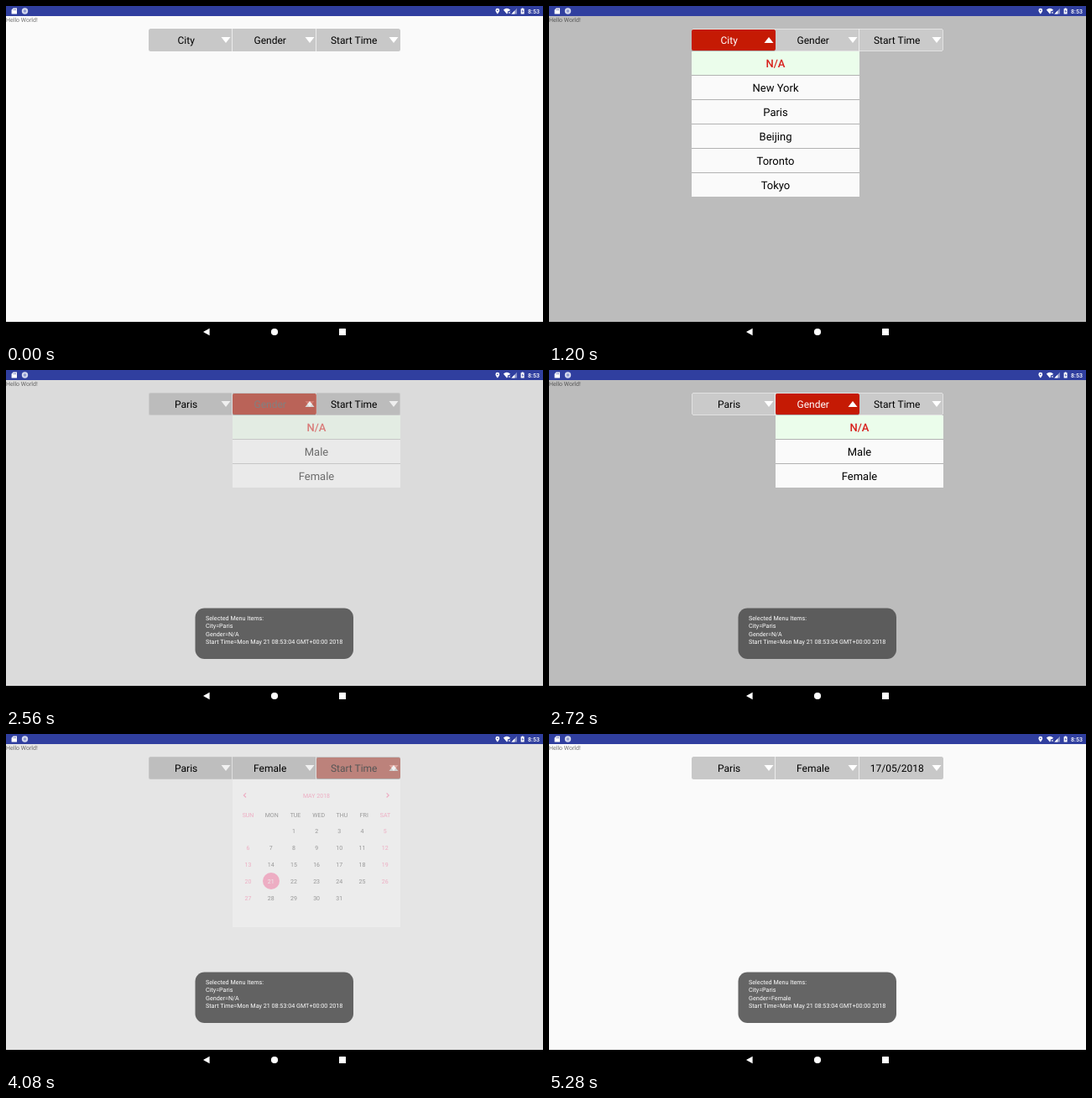
An HTML page that plays this animation: 640x400 px, repeating every 6560 ms.

```html
<!DOCTYPE html>
<html lang="en">
<head>
<meta charset="utf-8">
<title>Drop-down menu</title>
<style>
html, body { margin: 0; width: 100%; height: 100%; overflow: hidden; background: #fafafa; }
svg { display: block; width: 640px; height: 400px; font-family: Roboto, sans-serif; text-rendering: geometricPrecision; }
</style>
</head>
<body>
<svg id="stage" viewBox="0 0 640 400"></svg>
<script>
const LOOP = 6560, STEP = 80;
const PINK = '#ff4081', RED = '#c51a04';
const stage = document.getElementById('stage');

function add(parent, name, attrs = {}, content) {
  const node = document.createElementNS('http://www.w3.org/2000/svg', name);
  for (const key in attrs) node.setAttribute(key, attrs[key]);
  if (content !== undefined) node.textContent = content;
  return parent.appendChild(node);
}
const group = (parent = stage) => add(parent, 'g');
const box = (parent, x, y, width, height, fill, extra) =>
  add(parent, 'rect', { x, y, width, height, fill, ...extra });
const path = (parent, d, fill, extra) => add(parent, 'path', { d, fill, ...extra });
const dot = (parent, cx, cy, r, fill) => add(parent, 'circle', { cx, cy, r, fill });
const label = (parent, x, y, size, str, fill = '#000', extra) =>
  add(parent, 'text', { x, y, 'font-size': size, fill, 'text-anchor': 'middle', ...extra }, str);
const left = { 'text-anchor': 'start' };

function arrow(parent, x, up) {
  const [base, tip] = up ? [44, 37] : [37, 44];
  path(parent, `M${x - 5.5} ${base}h11L${x} ${tip}z`, '#fff');
}

// Three tabs; the open one is red with its arrow turned up.
function tabs(parent, names, open = -1) {
  const isOpen = open >= 0;
  if (isOpen) box(parent, 170.5, 27.5, 299, 26, '#cacaca', { rx: 1.5, stroke: '#e2e2e2' });
  else box(parent, 170, 27, 300, 27, '#c8c8c8', { rx: 2.5 });
  for (const x of [269, 369]) box(parent, x, 27, 1, 27, '#ececec');
  if (isOpen) {
    box(parent, 170 + open * 100, 29, 100, 25, '#000', { rx: 2, opacity: 0.22 });
    box(parent, 170 + open * 100, 28, 100, 25, RED, { rx: 2 });
  }
  return names.map((name, i) => {
    arrow(parent, 262 + i * 100, i === open);
    return label(parent, 214.7 + i * 100, 45.2, 12, name, i === open ? '#fff' : '#000');
  });
}

function list(parent, x, items) {
  box(parent, x, 54, 200, items.length * 29 - 1, '#b2b2b2');
  items.forEach((item, i) => {
    const y = 54 + i * 29;
    box(parent, x, y, 200, 28, i ? '#fafafa' : '#ebfdeb');
    label(parent, x + 100, y + 19, 13, item, i ? '#000' : '#d8201c', { 'font-weight': i ? 400 : 500 });
  });
}

function calendar(parent) {
  box(parent, 270, 54, 200, 176, '#fafafa');
  label(parent, 370, 75.6, 7, 'MAY 2018', PINK);
  for (const d of ['M286 70.3l-2.6 2.6 2.6 2.6', 'M453.6 70.3l2.6 2.6-2.6 2.6'])
    path(parent, d, 'none', { stroke: PINK, 'stroke-width': 1.2 });
  const heads = [288.5, 316.7, 345, 372.7, 400.4, 426.8, 452];
  'SUN MON TUE WED THU FRI SAT'.split(' ').forEach((day, i) =>
    label(parent, heads[i], 99, 7, day, i % 6 ? '#000' : PINK));
  dot(parent, 316, 175, 10, PINK);
  for (let day = 1; day <= 31; day++) {
    const cell = day + 1, col = cell % 7, row = Math.floor(cell / 7);
    const fill = day === 21 ? '#fff' : col % 6 ? '#000' : PINK;
    label(parent, 288.5 + col * 27.2, 117.6 + row * 20, 7, day, fill);
  }
}

function toast(gender) {
  const g = group();
  box(g, 225.5, 283.5, 188.5, 60.5, 'rgb(76,76,76)', { rx: 11, 'fill-opacity': 0.85 });
  ['Selected Menu Items:', 'City=Paris', 'Gender=' + gender,
    'Start Time=Mon May 21 08:53:04 GMT+00:00 2018'].forEach((line, i) =>
    label(g, 238, 297.5 + i * 9.5, 7.2, line, '#fff', left));
  return g;
}

function systemBars() {
  const g = group();
  box(g, 0, 0, 640, 12, '#303f9f');
  path(g, 'M8.6 2.6H13v6.9H6.6V4.7z', '#fff');
  path(g, 'M9 3.7v1.5M10.3 3.7v1.5M11.6 3.7v1.5', 'none', { stroke: '#303f9f', 'stroke-width': 0.6 });
  dot(g, 22.5, 6, 3.7, '#d3d8ee');
  dot(g, 22.5, 6, 1.7, '#8f9ad0');
  path(g, 'M585.8 9.6c-1.6-2-2.4-3.3-2.4-4.4a2.4 2.4 0 0 1 4.8 0c0 1.1-.8 2.4-2.4 4.4z', '#fff');
  dot(g, 585.8, 5.2, 0.8, '#303f9f');
  path(g, 'M592.8 4.4q4.1-3.3 8.2 0l-1.2 1.5h-1.9v2.4l-1 1.2z', '#fff');
  path(g, 'M598.6 6.6l2.4 2.4m0-2.4l-2.4 2.4', 'none', { stroke: '#fff', 'stroke-width': 0.7 });
  path(g, 'M602.3 9.5l6.6-6.8v6.8z', '#8f98cb');
  path(g, 'M602.3 9.5l4-4.1v4.1z', '#fff');
  path(g, 'M613.6 3.2h1.1v-.8h1.8v.8h1.1v6.4h-4z', '#fff');
  path(g, 'M615.9 4.2l-1.2 2.3h.8v1.9l1.2-2.4h-.8z', '#303f9f');
  label(g, 629, 8.6, 7, '8:53', '#fff', { 'font-weight': 500 });

  box(g, 0, 376, 640, 24, '#000');
  path(g, 'M235 388l7.6-4.3v8.6z', '#fff');
  dot(g, 320, 388, 4.1, '#fff');
  box(g, 397, 384, 8, 8, '#fff', { rx: 0.6 });
}

box(stage, 0, 0, 640, 400, '#fafafa');
label(stage, 0, 19.4, 7, 'Hello World!', '#757575', left);
const baseTabs = tabs(group(), ['City', 'Gender', 'Start Time']);
const dim = box(stage, 0, 12, 640, 364, '#000');

const cityMenu = group();
tabs(cityMenu, ['City', 'Gender', 'Start Time'], 0);
list(cityMenu, 170, ['N/A', 'New York', 'Paris', 'Beijing', 'Toronto', 'Tokyo']);

const genderMenu = group();
tabs(genderMenu, ['Paris', 'Gender', 'Start Time'], 1);
list(genderMenu, 270, ['N/A', 'Male', 'Female']);

const dateMenu = group();
tabs(dateMenu, ['Paris', 'Female', 'Start Time'], 2);
calendar(dateMenu);

const firstToast = toast('N/A'), secondToast = toast('Female');
systemBars();

// Opacity tracks: [time, value] pairs.
const tracks = [
  [dim, [[880, 0], [1200, .25], [2000, .25], [2080, .02], [2160, 0], [2400, 0], [2720, .25],
    [3440, .25], [3520, .14], [3680, 0], [4000, 0], [4240, .25], [4720, .25], [4800, .14], [4960, 0]]],
  [cityMenu, [[880, 0], [1200, 1], [2000, 1], [2080, 0]]],
  [genderMenu, [[2400, 0], [2720, 1], [3440, 1], [3520, 0]]],
  [dateMenu, [[4000, 0], [4240, 1], [4720, 1], [4800, 0]]],
  [firstToast, [[2000, 0], [2080, .146], [2240, .6], [2560, 1], [4720, 1], [4960, .4], [5200, 0]]],
  [secondToast, [[4720, 0], [4960, .6], [5280, 1]]]
];
const choices = [[2080, 'City', 'Paris'], [3520, 'Gender', 'Female'], [4800, 'Start Time', '17/05/2018']];

function valueAt(keys, t) {
  const i = keys.findIndex(key => key[0] > t);
  if (i === 0) return keys[0][1];
  if (i < 0) return keys[keys.length - 1][1];
  const [t0, v0] = keys[i - 1], [t1, v1] = keys[i];
  return v0 + (v1 - v0) * (t - t0) / (t1 - t0);
}

function draw(t) {
  for (const [node, keys] of tracks) node.setAttribute('opacity', valueAt(keys, t));
  choices.forEach(([at, before, after], i) => {
    const name = t < at ? before : after;
    if (baseTabs[i].textContent !== name) baseTabs[i].textContent = name;
  });
}

const start = performance.now();
function tick() {
  const t = (performance.now() - start) % LOOP;
  draw(Math.floor(t / STEP) * STEP);
  requestAnimationFrame(tick);
}
draw(0);
requestAnimationFrame(tick);
</script>
</body>
</html>
```
